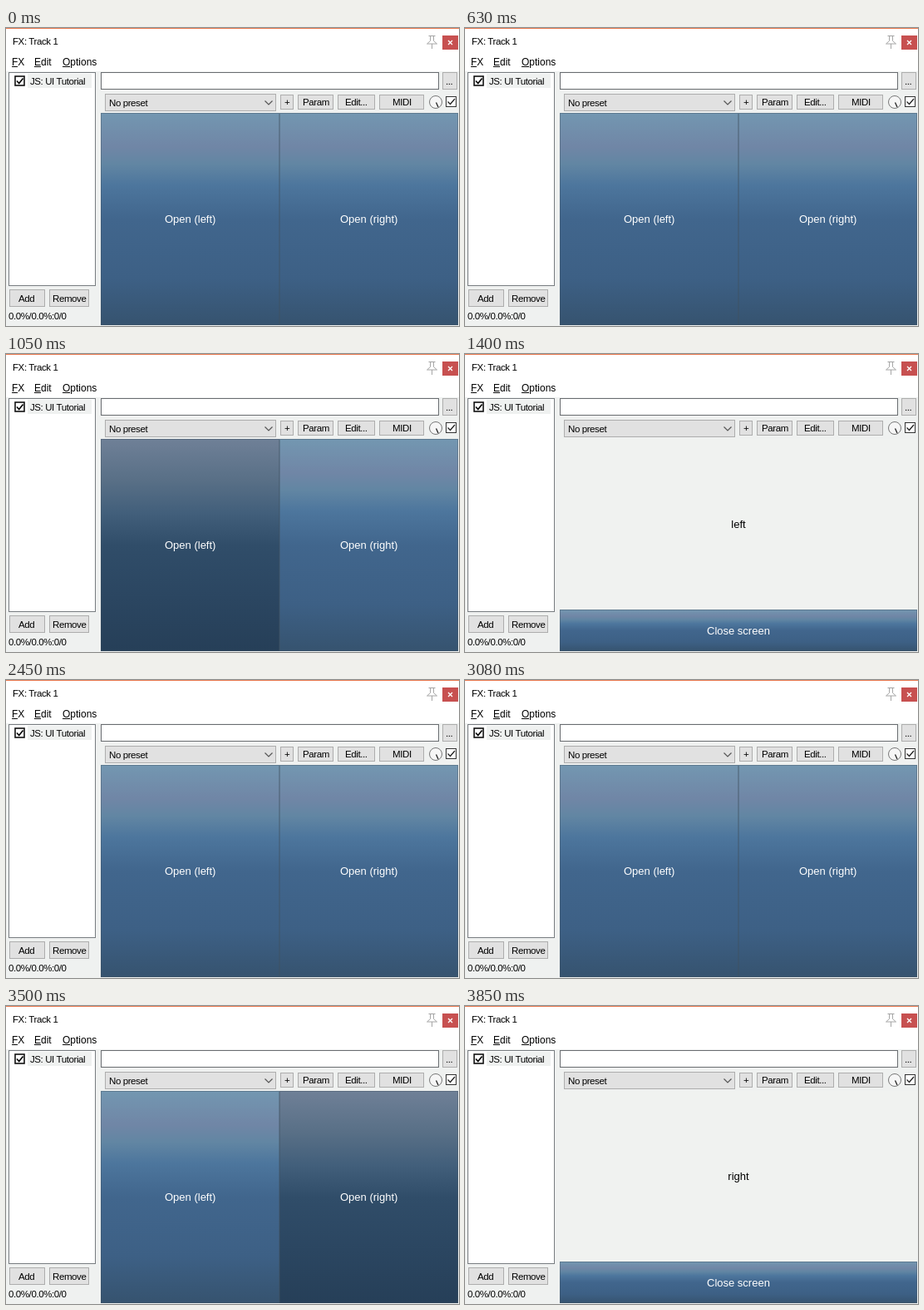
Animation, 545 px wide and 358 px high, one loop 4.9 s. Source, as an HTML page:

```html
<!DOCTYPE html>
<html lang="en">
<head>
<meta charset="utf-8">
<title>Effect window</title>
<style>
  html, body { margin: 0; width: 100%; height: 100%; overflow: hidden; background: #eff1f0; }
  svg { display: block; width: 545px; height: 358px; }
  text { font-family: "Liberation Sans", Arial, sans-serif; white-space: pre; }
  .ui { font-size: 11.5px; letter-spacing: -.4px; fill: #000; }
  .menu { font-size: 12px; fill: #000; }
  .gfx { font-size: 13px; }
</style>
</head>
<body>
<svg id="stage" viewBox="0 0 545 358" xmlns="http://www.w3.org/2000/svg">
  <defs>
    <linearGradient id="idle" x1="0" y1="0" x2="0" y2="1">
      <stop offset="0" stop-color="#7397b1"/>
      <stop offset=".16" stop-color="#7086a6"/>
      <stop offset=".24" stop-color="#6286a3"/>
      <stop offset=".34" stop-color="#4d769d"/>
      <stop offset=".5" stop-color="#41668d"/>
      <stop offset=".78" stop-color="#3d6085"/>
      <stop offset="1" stop-color="#36536f"/>
    </linearGradient>
    <linearGradient id="pressed" x1="0" y1="0" x2="0" y2="1">
      <stop offset="0" stop-color="#6f8097"/>
      <stop offset=".2" stop-color="#586f86"/>
      <stop offset=".35" stop-color="#425f7b"/>
      <stop offset=".5" stop-color="#304d69"/>
      <stop offset=".75" stop-color="#2b4661"/>
      <stop offset="1" stop-color="#263f58"/>
    </linearGradient>
  </defs>
  <g id="chrome"></g>
  <g id="menuScreen"></g>
  <g id="detailScreen"></g>
</svg>
<script>
const byId = id => document.getElementById(id);

function add(parent, tag, attrs, content) {
  const el = document.createElementNS("http://www.w3.org/2000/svg", tag);
  for (const key in attrs) el.setAttribute(key, attrs[key]);
  if (content) el.textContent = content;
  parent.appendChild(el);
  return el;
}

const fillRect = (g, x, y, width, height, fill) =>
  add(g, "rect", { x, y, width, height, fill });

const box = (g, x, y, w, h, fill, stroke) =>
  add(g, "rect", { x: x + .5, y: y + .5, width: w - 1, height: h - 1, fill, stroke });

const line = (g, d, stroke, width = 1) =>
  add(g, "path", { d, stroke, fill: "none", "stroke-width": width });

const label = (g, x, y, str, cls = "ui", fill = "#000") =>
  add(g, "text", { x, y, class: cls, style: `fill:${fill}` }, str);

function button(g, x, y, w, h, str, textX, textY) {
  box(g, x, y, w, h, "#e1e1e1", "#adadad");
  label(g, textX, textY, str);
}

function drawTitle(g) {
  fillRect(g, 0, 0, 545, 52, "#fff");
  fillRect(g, 0, 0, 545, 1, "#e8794f");
  label(g, 8, 20, "FX: Track 1");
  fillRect(g, 525, 9, 19, 17, "#c75050");
  line(g, "M532 15l5 5m0-5l-5 5", "#fff", 1.3);
  line(g, "M508.5 9.5h8m-6 0v6l-4 3.5h12l-4-3.5v-6M512.5 19v6", "#a5a5a5");
  [["FX", 7, 7], ["Edit", 34, 8], ["Options", 68, 9]].forEach(([str, x, w]) => {
    label(g, x, 45, str, "menu");
    fillRect(g, x, 46, w, 1, "#000");
  });
}

function drawSidebar(g) {
  box(g, 3, 53, 105, 257, "#fff", "#777c80");
  fillRect(g, 26, 55, 77, 17, "#eff1f0");
  add(g, "rect", { x: 11, y: 58, width: 11, height: 11, fill: "#fff", stroke: "#111", "stroke-width": 1.6 });
  line(g, "M13 63.5l2.7 3 4.8-6", "#000", 1.7);
  label(g, 29, 68, "JS: UI Tutorial");
  button(g, 4, 314, 43, 21, "Add", 15, 329);
  button(g, 52, 314, 48, 21, "Remove", 56, 329);
  label(g, 3, 350, "0.0%/0.0%:0/0");
}

function drawToolbar(g) {
  box(g, 114, 53, 407, 21, "#fff", "#686c70");
  button(g, 525, 53, 18, 21, "...", 529, 68);
  button(g, 119, 79, 206, 21, "No preset", 124, 94);
  line(g, "M311.5 87.5l4.5 4.5 4.5-4.5", "#555", 1.2);
  button(g, 330, 80, 16, 18, "+", 335, 93);
  button(g, 351, 80, 43, 18, "Param", 357, 93);
  button(g, 399, 80, 45, 18, "Edit...", 408, 93);
  button(g, 449, 80, 54, 18, "MIDI", 465, 93);
  add(g, "circle", { cx: 517, cy: 89, r: 7.5, fill: "#f6f6f6", stroke: "#777" });
  line(g, "M517.5 89.5l2.5 5.5", "#222", 1.3);
  box(g, 529, 82, 13, 13, "#fff", "#333");
  line(g, "M531.5 88.5l3 3 5.5-6.5", "#222", 1.3);
}

function gradientButton(g, x, y, w, h, str, textX, textY) {
  const face = fillRect(g, x, y, w, h, "url(#idle)");
  add(g, "rect", { x: x + .5, y: y + .5, width: w - 1, height: h - 1,
    fill: "none", stroke: "#40505f", "stroke-opacity": .4 });
  label(g, textX, textY, str, "gfx", "#fff");
  return face;
}

const chrome = byId("chrome");
const menuScreen = byId("menuScreen");
const detailScreen = byId("detailScreen");

fillRect(chrome, 0, 0, 545, 358, "#eff1f0");
drawTitle(chrome);
drawSidebar(chrome);
drawToolbar(chrome);

const faces = {
  left: gradientButton(menuScreen, 114, 102, 215, 255, "Open (left)", 191, 234),
  right: gradientButton(menuScreen, 329, 102, 215, 255, "Open (right)", 402, 234)
};

fillRect(detailScreen, 114, 102, 430, 205, "#f0f2f0");
const heading = label(detailScreen, 329, 209, "", "gfx");
heading.setAttribute("text-anchor", "middle");
gradientButton(detailScreen, 114, 307, 430, 50, "Close screen", 291, 337);

// Each side takes half the loop: idle, pressed, then its own screen.
const HALF = 2450, PRESS = 1050, OPEN = 1400;

function render(ms) {
  const t = ms % (2 * HALF);
  const side = t < HALF ? "left" : "right";
  const local = t % HALF;
  const open = local >= OPEN;
  for (const name in faces) {
    const down = name === side && local >= PRESS && !open;
    faces[name].setAttribute("fill", down ? "url(#pressed)" : "url(#idle)");
  }
  heading.textContent = side;
  menuScreen.setAttribute("display", open ? "none" : "inline");
  detailScreen.setAttribute("display", open ? "inline" : "none");
}

const start = performance.now();
function tick() {
  render(performance.now() - start);
  requestAnimationFrame(tick);
}
tick();
</script>
</body>
</html>
```
